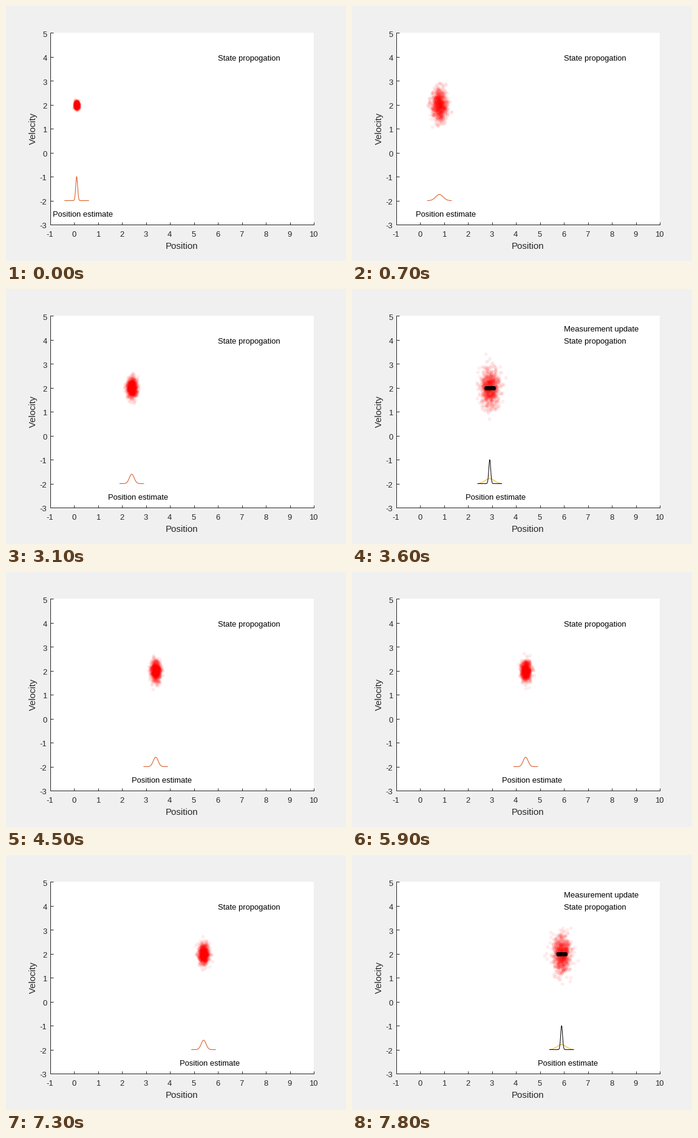
A matplotlib script for the animation above (8 s loop, 560 px wide and 420 px high).

```python
import numpy as np
import matplotlib
import matplotlib.pyplot as plt
from matplotlib.animation import FuncAnimation

W, H, DPI = 560, 420, 80
PX = 72 / DPI                       # one pixel in points
LEFT, RIGHT, TOP, BOTTOM = 73, 507, 44.4, 360
INK = "#262626"
PARTICLES = 800

matplotlib.rcParams["toolbar"] = "None"
matplotlib.rcParams["font.family"] = "Liberation Sans"
matplotlib.rcParams["text.kerning_factor"] = 6      # no kerning

fig = plt.figure(figsize=(W / DPI, H / DPI), dpi=DPI, facecolor="#f0f0f0")
ax = fig.add_axes([LEFT / W, 1 - BOTTOM / H, (RIGHT - LEFT) / W, (BOTTOM - TOP) / H])
ax.set(xlim=(-1, 10), ylim=(-3, 5), xticks=range(-1, 11), yticks=range(-3, 6))
ax.spines[["top", "right"]].set_visible(False)
for side in ("left", "bottom"):
    ax.spines[side].set(color=INK, linewidth=PX)
ax.tick_params(direction="in", length=4.5 * PX, width=PX, color=INK,
               labelbottom=False, labelleft=False)


def px_x(x):
    return LEFT + (x + 1) * (RIGHT - LEFT) / 11


def px_y(y):
    return TOP + (5 - y) * (BOTTOM - TOP) / 8


def label(x, y, text, size=13, color="black", ha="left", **kw):
    """Text with its baseline at a pixel position, y counted from the top."""
    return fig.text(x / W, 1 - y / H, text, fontsize=size * PX, color=color,
                    ha=ha, va="baseline", **kw)


for v in range(-1, 11):
    label(px_x(v) - (1 if v < 0 else 0.5), 380, str(v), color=INK, ha="center")
for v in range(-3, 6):
    label(67.5, px_y(v) + 6.2, str(v), color=INK, ha="right")
label(289.5, 400, "Position", 15, INK, "center")
label(48.5, 202, "Velocity", 15, INK, "center", rotation=90, rotation_mode="anchor")

label(px_x(6), 90, "State propogation")
update_text = label(px_x(6), 70, "Measurement update")
estimate_text = label(0, 347, "Position estimate")


def dots(color, size, alpha):
    return ax.scatter([], [], s=(size * PX) ** 2, c=color, alpha=alpha, linewidths=0)


cloud = dots("red", 6, 0.07)
measured = dots("black", 7, 0.15)
prior, = ax.plot([], [], lw=PX)
posterior, = ax.plot([], [], color="black", lw=PX)

span = np.linspace(-0.5, 0.5, 101)


def bell(sigma):
    return -2 + 0.1 * np.exp(-span ** 2 / (2 * sigma ** 2)) / (sigma * np.sqrt(2 * np.pi))


def scatter_points(rng, pos, sx, sv):
    return rng.normal((pos, 2), (sx, sv), (PARTICLES, 2))


def draw(i):
    # Ten prediction steps per cycle; the last one is held with its update.
    cycle, phase = divmod(i + 1, 14)
    updating = phase >= 9
    step = min(phase, 9)
    pos = cycle + step / 10
    age = step + (cycle > 0)
    sx = np.hypot(0.035, 0.019 * age)
    sv = np.hypot(0.06, 0.04 * age)

    rng = np.random.default_rng(10 * cycle + step)
    cloud.set_offsets(scatter_points(rng, pos, sx, sv))
    measured.set_offsets(scatter_points(rng, pos, 0.06, 0))
    prior.set_data(pos + span, bell(sx))
    prior.set_color("#edb120" if updating else "#d95319")
    posterior.set_data(pos + span, bell(0.04))
    estimate_text.set_x(px_x(pos - 1) / W)
    for artist in (measured, posterior, update_text):
        artist.set_visible(updating)
    return cloud, measured, prior, posterior, estimate_text, update_text


anim = FuncAnimation(fig, draw, frames=80, interval=100, repeat=True,
                     repeat_delay=0, blit=False)
plt.show()
```
